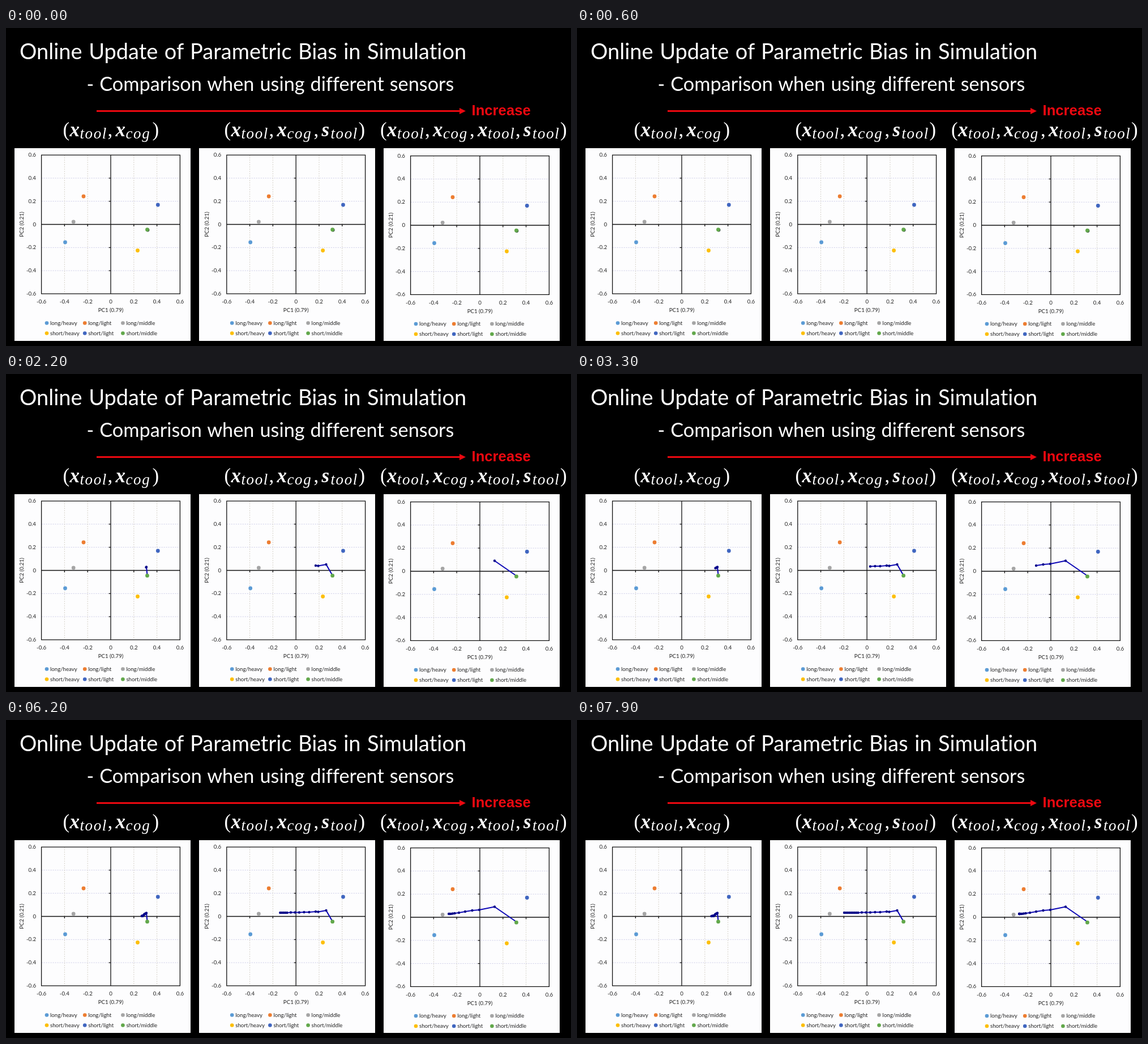
Recreate the animation shown at these times as an HTML page. Size 998 by 561 pixels, loop 8000 ms.

```html
<!DOCTYPE html>
<html lang="en">
<head>
<meta charset="utf-8">
<title>Online update</title>
<style>
  html, body { margin: 0; width: 100%; height: 100%; overflow: hidden; background: #000; }
  svg { display: block; width: 998px; height: 561px; }
  text { font-family: Lato, Carlito, sans-serif; font-variant-ligatures: none; fill: #fff; }
  .small { font-size: 9.7px; fill: #222; }
  .mid { text-anchor: middle; }
  .end { text-anchor: end; }
  .math { font-family: "Liberation Serif", "Times New Roman", serif; font-size: 35px; }
  .vec { font-weight: bold; font-style: italic; }
  .sub { font-size: 27px; font-style: italic; letter-spacing: 1.6px; }
  .axis { fill: none; stroke: #111; stroke-width: 1.3; }
  .grid { fill: none; stroke-width: 1; stroke-dasharray: 2 2; }
  .trace { fill: none; stroke: #0e08b6; stroke-width: 2.1; stroke-linejoin: round;
           marker-mid: url(#node); marker-end: url(#node); }
</style>
</head>
<body>
<svg id="stage" viewBox="0 0 998 561">
  <defs>
    <marker id="node" markerUnits="userSpaceOnUse" markerWidth="6" markerHeight="6" refX="3" refY="3">
      <circle cx="3" cy="3" r="2.2" fill="#08088a"/>
    </marker>
  </defs>
  <rect width="998" height="561"/>
  <text x="24" y="55" font-size="38" word-spacing="1.8">Online Update of Parametric Bias in Simulation</text>
  <text x="142.5" y="111" font-size="34.3" word-spacing="1.2">- Comparison when using different sensors</text>
  <path d="M160 146.5H803" stroke="#ec0810" stroke-width="3"/>
  <path d="M801 141L812 146.5L801 152Z" fill="#ec0810"/>
  <text x="822.5" y="154" font-size="25.7" font-weight="bold"
        style="font-family:'Liberation Sans',Arial,sans-serif;fill:#ec0810">Increase</text>
</svg>
<script>
const stage = document.getElementById('stage');
const LOOP = 8000, STEP = 400;
const CX = 185, CY = 346.5, UNIT = 204;

function add(parent, tag, attrs, text) {
  const node = document.createElementNS('http://www.w3.org/2000/svg', tag);
  for (const key in attrs) node.setAttribute(key, attrs[key]);
  if (text) node.textContent = text;
  parent.append(node);
  return node;
}

// Formula tokens: advance width, style, baseline shift
const glyphs = {
  '(': [12, '', 0], ')': [12, '', 0], ',': [14, '', 0],
  x: [18, 'vec', 0], s: [16, 'vec', 0],
  tool: [49, 'sub', 4], cog: [47, 'sub', 4]
};
function formula(x, tokens) {
  for (const token of tokens.split(' ')) {
    const [width, style, shift] = glyphs[token];
    add(stage, 'text', { x, y: 191 + shift, class: 'math ' + style }, token);
    x += width;
  }
}
formula(100.5, '( x tool , x cog )');
formula(385.5, '( x tool , x cog , s tool )');
formula(661, '( x tool , x cog , x tool , s tool )');

// Name, colour and plot position
const tools = [
  ['long/heavy', '#5b9bd5', 104.5, 378],
  ['long/light', '#ed7d31', 137, 297],
  ['long/middle', '#a5a5a5', 119.2, 342],
  ['short/heavy', '#fdbf08', 232.5, 392.5],
  ['short/light', '#4066c0', 268.3, 312],
  ['short/middle', '#62a84b', 249.5, 355.7]
];

function chart(panelX, dx, dy) {
  add(stage, 'rect', { x: panelX, y: 212, width: 311, height: 340, fill: '#fdfdfe' });
  const g = add(stage, 'g', { transform: `translate(${dx} ${dy})` });
  const label = (x, y, text, cls = '') => add(g, 'text', { x, y, class: 'small ' + cls }, text);
  const half = 0.6 * UNIT;
  const left = CX - half, top = CY - half, size = 2 * half;
  let across = '', down = '', ticks = '';
  for (let i = -3; i <= 3; i++) {
    const x = CX + i * 0.2 * UNIT, y = CY - i * 0.2 * UNIT;
    const value = i ? (i * 0.2).toFixed(1) : '0';
    label(x, 486, value, 'mid');
    label(53, y + 3, value, 'end');
    if (i && Math.abs(i) < 3) {
      across += `M${left} ${y}h${size}`;
      down += `M${x} ${top}v${size}`;
      ticks += `M${x} ${CY}v3.5M${CX} ${y}h-3.5`;
    }
  }
  add(g, 'path', { d: across, class: 'grid', stroke: '#cbcbe6' });
  add(g, 'path', { d: down, class: 'grid', stroke: '#d4d0c6' });
  add(g, 'path', { d: `M${left} ${top}h${size}v${size}h${-size}zM${left} ${CY}h${size}M${CX} ${top}v${size}` + ticks, class: 'axis' });
  label(CX, 501, 'PC1 (0.79)', 'mid');
  label(0, 0, 'PC2 (0.21)', 'mid').setAttribute('transform', `translate(31 ${CY}) rotate(-90)`);

  const start = add(g, 'circle', { cx: 250.3, cy: 356.3, r: 3.1, fill: '#1c2a30' });
  const trace = add(g, 'path', { class: 'trace', transform: `translate(${-dx} ${-dy})` });
  tools.forEach(([name, fill, cx, cy], i) => {
    const x = 72 + i % 3 * 67.2, y = i < 3 ? 520.5 : 538.5;
    add(g, 'circle', { cx, cy, r: 3.4, fill });
    add(g, 'circle', { cx: x, cy: y, r: 3.3, fill });
    label(x + 6, y + 3.2, name);
  });
  return { start, trace };
}

// Each trace: known points first, then a settling tail for later steps
const runs = [
  { view: chart(15, 0, 0), begin: 1700,
    points: [[249.5, 355], [248, 340.5], [247.5, 341], [246.5, 341.5], [245.5, 342], [244.5, 342.5],
             [243.8, 343.5], [243, 344.5], [242, 345.5]],
    tail: k => [242 - 0.56 * k, 345.5 + 0.06 * k] },
  { view: chart(341, 327.2, 0), begin: 1300,
    points: [[576.5, 355], [565.5, 336], [551.5, 338.5], [547, 338], [535.5, 339], [526.5, 339],
             [518, 339.5], [510.5, 339.5], [503, 339.5], [496.5, 340]],
    tail: k => [496.5 - 3.05 * k, 340] },
  { view: chart(667, 652, 1.5), begin: 1900,
    points: [[901.5, 356], [863, 329.5], [836, 335], [823.5, 336], [811, 338],
             [800, 340], [792.5, 341], [789, 341.5], [786, 342]],
    tail: k => [781 + 5 * 0.6 ** k, 342] }
];

function draw(now) {
  const t = now % LOOP;
  for (const { view, begin, points, tail } of runs) {
    const count = Math.max(0, Math.floor((t - begin) / STEP) + 1);
    const path = [];
    for (let i = 0; i <= count; i++) path.push(points[i] || tail(i - points.length + 1));
    view.trace.setAttribute('d', count ? 'M' + path.join('L') : '');
    view.start.setAttribute('visibility', t < 1000 ? 'visible' : 'hidden');
  }
  requestAnimationFrame(draw);
}
requestAnimationFrame(draw);
</script>
</body>
</html>
```
